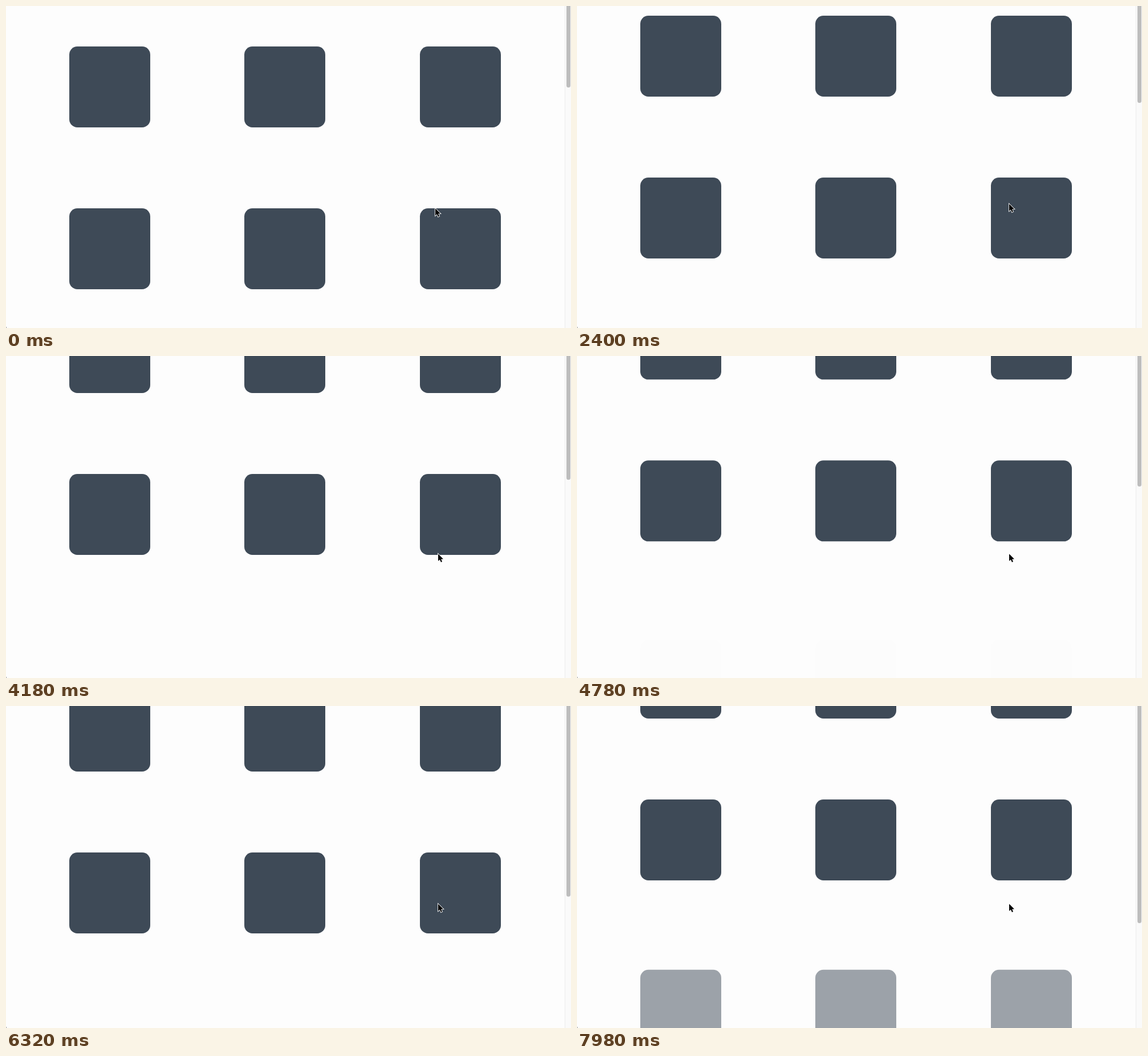
Animation of 991 by 565 pixels, one loop 8000 ms. Source, as an HTML page with a canvas:

```html
<!DOCTYPE html>
<html lang="en">
<head>
<meta charset="utf-8">
<title>Scroll reveal</title>
<style>
  html, body { margin: 0; width: 100%; height: 100%; overflow: hidden; background: #fdfdfd; }
  canvas { display: block; }
</style>
</head>
<body>
<canvas id="stage" width="991" height="565"></canvas>
<script>
const ctx = document.getElementById('stage').getContext('2d');
const W = 991, H = 565, LOOP = 8000;
const SIZE = 142, RADIUS = 14.2, PITCH = 284, TOP = 71;
const COLUMNS = [111, 418, 726];
const RISE = 30, FADE = 1000;
const REVEAL = [-FADE, -FADE, 4770, 7685]; // start of each row's fade

// [time, scroll offset]
const SCROLL = [
  [0, 0], [200, 5], [820, 39], [1240, 47], [1560, 54], [2500, 54],
  [3200, 81.5], [4080, 147], [4180, 148], [4770, 171], [5440, 242],
  [5860, 357], [6320, 382], [7160, 382], [7400, 415], [7680, 457],
  [7960, 475], [8000, 475]
];

const slope = i => (SCROLL[i + 1][1] - SCROLL[i][1]) / (SCROLL[i + 1][0] - SCROLL[i][0]);

function tangent(i) {
  if (i === 0 || i === SCROLL.length - 1) return 0;
  const a = slope(i - 1), b = slope(i);
  return a * b <= 0 ? 0 : 2 * a * b / (a + b);
}

// Monotone cubic interpolation, so the page never scrolls back
function scrollAt(t) {
  let i = 0;
  while (i < SCROLL.length - 2 && t >= SCROLL[i + 1][0]) i++;
  const [t0, y0] = SCROLL[i], [t1, y1] = SCROLL[i + 1];
  const d = t1 - t0, u = (t - t0) / d, v = 1 - u;
  return y0 * (1 + 2 * u) * v * v + y1 * u * u * (3 - 2 * u)
    + d * (tangent(i) * u * v * v - tangent(i + 1) * u * u * v);
}

// cubic-bezier(.25, .1, .25, 1)
function ease(x) {
  if (x <= 0) return 0;
  if (x >= 1) return 1;
  const bez = (s, a, b) => 3 * a * s * (1 - s) ** 2 + 3 * b * s * s * (1 - s) + s ** 3;
  let lo = 0, hi = 1;
  for (let i = 0; i < 24; i++) {
    const mid = (lo + hi) / 2;
    if (bez(mid, 0.25, 0.25) < x) lo = mid; else hi = mid;
  }
  return bez(lo, 0.1, 1);
}

function roundBox(x, y, w, h, r, color) {
  ctx.fillStyle = color;
  ctx.beginPath();
  ctx.roundRect(x, y, w, h, r);
  ctx.fill();
}

function drawRows(t, scroll) {
  REVEAL.forEach((start, row) => {
    const shown = ease((t - start) / FADE);
    if (!shown) return;
    const y = TOP + row * PITCH - scroll + RISE * (1 - shown);
    ctx.globalAlpha = shown;
    for (const x of COLUMNS) roundBox(x, y, SIZE, SIZE, RADIUS, '#3e4a57');
    ctx.globalAlpha = 1;
  });
}

function drawScrollbar(scroll) {
  ctx.fillStyle = '#fafafa';
  ctx.fillRect(980, 0, 11, H);
  ctx.fillStyle = '#ececec';
  ctx.fillRect(980, 0, 1, H);
  roundBox(983, -40, 7, 183 + scroll * 0.501, 3.5, '#bdbdbd');
}

function drawCursor(t) {
  const move = ease((t - 40) / 360);
  const arrow = [[0, 0], [0, 12.6], [2.9, 10], [4.9, 14.6], [7, 13.7], [5.1, 9.2], [9, 9]];
  ctx.save();
  ctx.translate(753 + 5 * move, 355.2 - 8 * move);
  ctx.beginPath();
  arrow.forEach(([x, y]) => ctx.lineTo(x, y));
  ctx.closePath();
  ctx.lineJoin = 'miter';
  ctx.lineWidth = 1.7;
  ctx.strokeStyle = '#fff';
  ctx.stroke();
  ctx.fillStyle = '#000';
  ctx.fill();
  ctx.restore();
}

function draw(t) {
  const scroll = scrollAt(t);
  ctx.fillStyle = '#fdfdfd';
  ctx.fillRect(0, 0, W, H);
  drawRows(t, scroll);
  drawScrollbar(scroll);
  ctx.fillStyle = '#999';
  ctx.fillRect(0, 563, 1, 2);
  drawCursor(t);
}

const begin = performance.now();
function tick() {
  draw((performance.now() - begin) % LOOP);
  requestAnimationFrame(tick);
}
tick();
</script>
</body>
</html>
```
